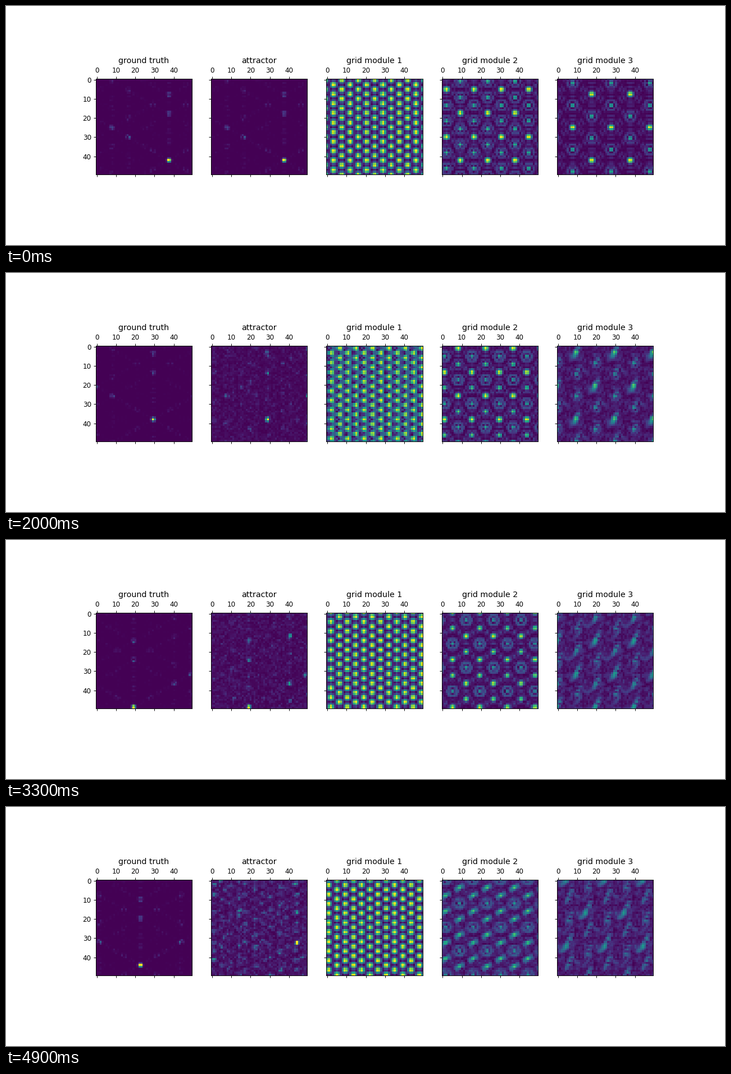
Animation, 1280 px wide and 427 px high, one loop 5 s. Source, as a matplotlib script:

```python
import numpy as np
import matplotlib.pyplot as plt
from matplotlib.animation import FuncAnimation

FRAMES, STEP_MS = 50, 100
SIZE = 50
SPACING = 2.46                # map units per phase step
DPI = 256 / 3
TITLES = ["ground truth", "attractor"] + [f"grid module {i}" for i in (1, 2, 3)]

# Three hexagonal axes, 120 degrees apart (x, y)
AXES = np.array([[0, 1], [np.sqrt(3) / 2, -0.5], [-np.sqrt(3) / 2, -0.5]])
GRID = np.arange(SIZE)

# Waypoints of the walk: frame, x, y
PATH = np.array([
    (0, 37.4, 42.2), (7, 34.0, 48.8), (20, 29.2, 38.0), (28, 21.9, 43.5),
    (33, 19.1, 48.6), (43, 14.7, 38.4), (49, 22.5, 44.2),
])


def position(frame):
    return np.array([np.interp(frame, PATH[:, 0], PATH[:, i]) for i in (1, 2)])


class Module:
    """Hexagonal residue code with the given modulus."""

    def __init__(self, modulus, seed):
        h = modulus // 2
        k1, k2 = np.mgrid[-h:h + 1, -h:h + 1].reshape(2, -1)
        k3 = (-k1 - k2 + h) % modulus - h
        k = np.stack([k1, k2, k3], axis=1)
        self.waves = 2 * np.pi / (modulus * SPACING) * k @ AXES
        self.wrap = k.sum(axis=1) / modulus
        self.chiral = np.sign((k1 - k2) * (k2 - k3) * (k3 - k1))
        self.jitter = self.make_jitter(np.random.default_rng(seed))
        # Separable parts of every plane wave
        self.wx, self.wy = np.exp(1j * self.waves.T[:, :, None] * GRID)

    def make_jitter(self, rng):
        """Phase errors: a smooth part plus grain, without any net shift."""
        w = self.waves
        smooth = np.cos(w @ rng.normal(0, 1.6, (2, 4))
                        + rng.uniform(0, 2 * np.pi, 4)).sum(axis=1)
        raw = smooth + 0.5 * rng.normal(size=len(w))
        plane = np.column_stack([w, np.ones(len(w))])
        raw = raw - plane @ np.linalg.lstsq(plane, raw, rcond=None)[0]
        return raw / raw.std()

    def response(self, pos, tilt=0, skew=0, noise=0):
        phase = (np.radians(tilt) * self.wrap + np.radians(skew) * self.chiral
                 + noise * self.jitter - self.waves @ pos)
        coef = np.exp(1j * phase)
        return np.abs((self.wy * coef[:, None]).T @ self.wx) / len(coef)


fine, middle, coarse = MODULES = [Module(m, seed=m) for m in (3, 5, 7)]


def drifted_maps(pos, frame):
    """Module responses as their phases slowly wear out."""
    u = frame / (FRAMES - 1)
    late = u ** 4
    bump = max(0, np.sin(np.pi * frame / 27))
    sway = 35 * (1 - u) * np.sin(2 * np.pi * frame / 20.5)
    return [
        fine.response(pos - [1.9 * bump + 0.4 * late, 0], skew=-35 * bump),
        middle.response(pos + np.array([0.3, 0.6]) * late,
                        tilt=sway - 62 * u ** 1.3,
                        noise=0.1 * u + 0.55 * late),
        coarse.response(pos + [2.3 * late, -0.5 * np.sin(np.pi * u)],
                        tilt=-130 * u ** 2, noise=1.3 * u ** 0.6),
    ]


def scaled(field):
    return field / field.max()


def panels(frame):
    pos = position(frame)
    truth = np.prod([m.response(pos) for m in MODULES], axis=0)
    maps = drifted_maps(pos, frame)
    rng = np.random.default_rng(100 + frame)
    grain = np.abs(rng.normal(size=(SIZE, SIZE)))
    grain *= 0.05 * (frame / FRAMES) ** 0.7
    attractor = scaled(np.prod(maps, axis=0)) + grain
    return [scaled(truth), scaled(attractor)] + [m / 0.96 for m in maps]


fig, axs = plt.subplots(1, 5, sharey=True, dpi=DPI,
                        figsize=(1280.01 / DPI, 427.01 / DPI))
fig.subplots_adjust(left=0.125, right=0.9, bottom=0.11, top=0.88, wspace=0.2)
images = []
for ax, title, field in zip(axs, TITLES, panels(0)):
    images.append(ax.matshow(field, vmin=0, vmax=1, cmap="viridis"))
    ax.set_title(title)
    ax.set_xticks(range(0, SIZE, 10))
    ax.set_yticks(range(0, SIZE, 10))


def update(frame):
    for image, field in zip(images, panels(frame)):
        image.set_data(field)
    return images


anim = FuncAnimation(fig, update, frames=FRAMES, interval=STEP_MS,
                     repeat=True, repeat_delay=0)
plt.show()
```
